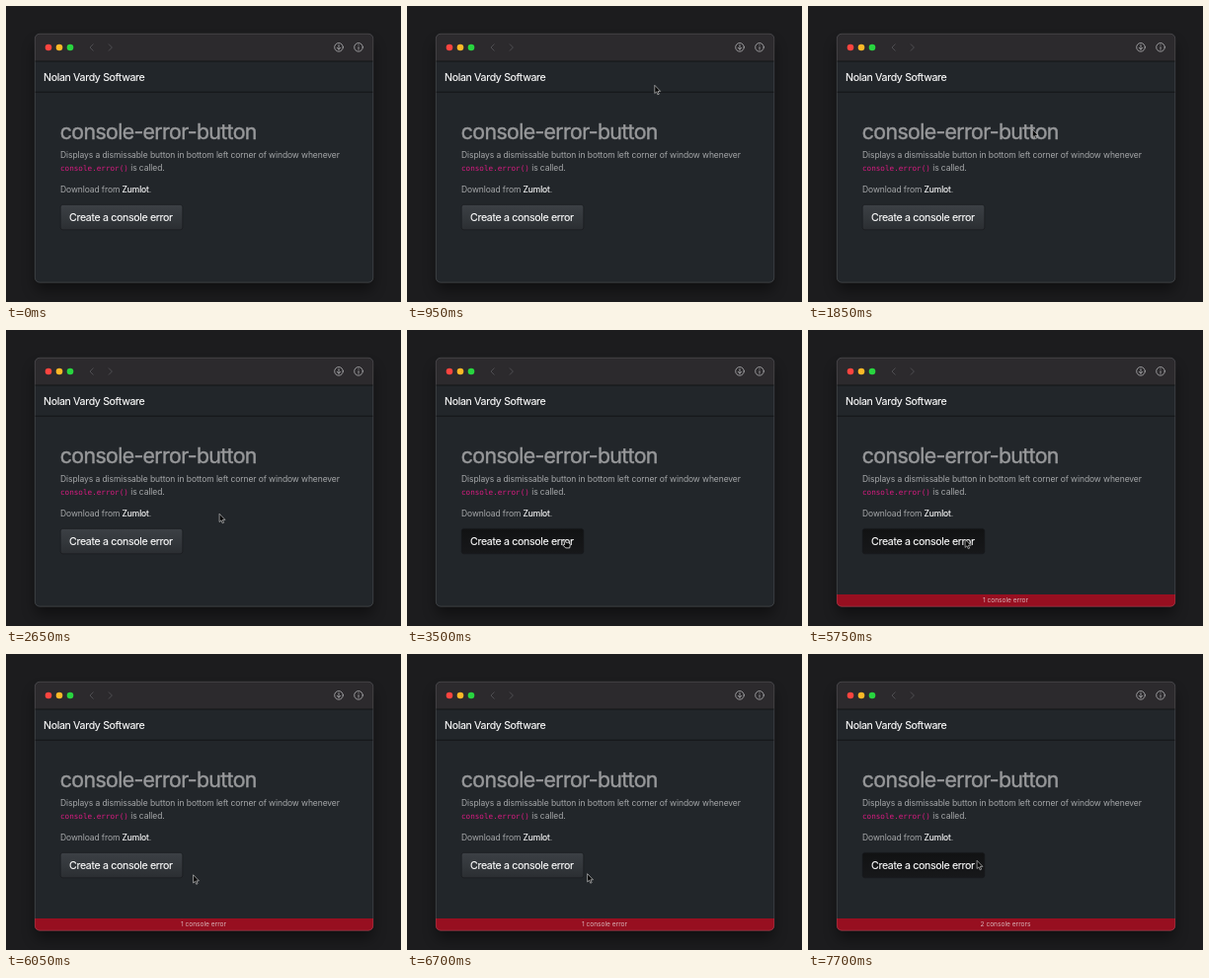
An HTML page that plays this animation: 400 px wide and 300 px high, repeating every 8 s.

```html
<!DOCTYPE html>
<html lang="en">
<head>
<meta charset="utf-8">
<title>console-error-button</title>
<style>
  html, body { margin: 0; width: 100%; height: 100%; overflow: hidden; background: #1c1c1e; }
  svg { display: block; width: 100%; height: 100%; }
  text { font-family: Inter, "Open Sans", sans-serif; font-optical-sizing: none; white-space: pre; }
  .large { font-size: 10.6px; letter-spacing: -.33px; fill: #fff; stroke: #fff; stroke-width: .12px; }
  .body { font-size: 8.5px; letter-spacing: -.088px; fill: #a6a8aa; }
  .heading { font-size: 21.3px; letter-spacing: -.64px; fill: #98999b; stroke: #98999b; stroke-width: .4px; }
  .code { font: 7.64px "DejaVu Sans Mono", "Noto Sans Mono", monospace; letter-spacing: 0; fill: #d81b80; }
  .link { fill: #fff; stroke: #fff; stroke-width: .12px; }
  .count { font-size: 6.6px; fill: #d8b4b8; text-anchor: middle; }
  .line { fill: none; stroke-linecap: round; stroke-linejoin: round; }
</style>
</head>
<body>
<svg viewBox="0 0 400 300">
  <defs>
    <linearGradient id="idle" x2="0" y2="1">
      <stop stop-color="#3c4045"/><stop offset=".6" stop-color="#32363a"/><stop offset="1" stop-color="#2b2e32"/>
    </linearGradient>
    <linearGradient id="dark" x2="0" y2="1">
      <stop stop-color="#111213"/><stop offset="1" stop-color="#17181a"/>
    </linearGradient>
    <filter id="blur" x="-20%" y="-20%" width="140%" height="140%"><feGaussianBlur stdDeviation="7"/></filter>
    <clipPath id="frame"><rect x="29" y="28" width="343" height="252.5" rx="5"/></clipPath>
  </defs>

  <rect width="400" height="300" fill="#1c1c1e"/>
  <rect x="29" y="37" width="343" height="252" rx="6" fill="#000" opacity=".4" filter="url(#blur)"/>

  <g clip-path="url(#frame)">
    <rect x="29" y="28" width="343" height="253" fill="#22262a"/>
    <rect x="29" y="28" width="343" height="28" fill="#2c2a2d"/>
    <rect x="29" y="55.5" width="343" height="1" fill="#131416"/>
    <rect x="29" y="86.7" width="343" height="1" fill="#131518"/>
    <g id="bar">
      <rect x="29" y="268" width="343" height="13" fill="#970f20"/>
      <text class="count" id="count" x="200" y="276.3"></text>
    </g>
  </g>
  <rect x="29.3" y="28.2" width="342.5" height="252" rx="5" fill="none" stroke="#fff" stroke-opacity=".22" stroke-width=".6"/>

  <circle cx="43" cy="42" r="3.3" fill="#fe443f"/>
  <circle cx="54" cy="42" r="3.3" fill="#fdb827"/>
  <circle cx="65" cy="42" r="3.3" fill="#28d53f"/>
  <path class="line" d="M88.2 38.8L85 42L88.2 45.2M104.2 38.8L107.4 42L104.2 45.2" stroke="#4e4d51"/>
  <g class="line" stroke="#b2b1b4" stroke-width=".8">
    <circle cx="337" cy="41.8" r="4.3"/>
    <path d="M337 39.5V44M335.2 42.3L337 44.1L338.8 42.3"/>
    <circle cx="357" cy="41.8" r="4.3"/>
    <path d="M357 41.5V44.1M357 39.5V39.6"/>
  </g>

  <text class="large" x="38" y="75.8">Nolan Vardy Software</text>
  <text class="heading" x="54.8" y="135.3">console-error-button</text>
  <text class="body" x="55" y="154">Displays a dismissable button in bottom left corner of window whenever</text>
  <text class="body" x="55" y="167"><tspan class="code">console.error()</tspan> is called.</text>
  <text class="body" x="55" y="189">Download from <tspan class="link">Zumlot</tspan>.</text>

  <rect id="button" x="55.2" y="201.4" width="123.6" height="25.4" rx="2.4" stroke="#17191b" stroke-width=".6"/>
  <text class="large" x="64" y="217.8">Create a console error</text>

  <g id="cursor">
    <path id="arrow" d="M.1 .3V8.5L2 6.9L3.2 9.8L4.6 9.2L3.3 6.4H5.9Z" fill="#050505" stroke="#d4d4d4" stroke-width=".65" stroke-linejoin="round"/>
    <path id="hand" d="M.9 1.6Q1.6 .6 2.4 1.6L3 4Q4 3.4 4.6 4.2Q5.6 3.8 6 4.7Q7.3 4.5 7.3 6L6.7 9.4H2.7L-.1 6.6Q-.3 5.4 1.7 6Z" fill="#0a0a0a" stroke="#eee" stroke-width=".8" stroke-linejoin="round"/>
  </g>
</svg>
<script>
  const LOOP = 8000, STEP = 50;
  const SHOW = 650, HAND = 3400, CLICK = 4150, BAR = 4200, SECOND = 7650;
  const $ = id => document.getElementById(id);

  // Pointer path: time, x, y
  const path = [
    [600, 245, -12], [950, 250.7, 80], [1200, 241, 113], [1450, 231, 124],
    [1600, 226.5, 122.5], [1800, 226.5, 122.5],
    [2200, 243, 173], [2500, 243, 173],
    [2650, 216, 186], [2900, 180, 203], [3350, 158, 211.5],
    [5700, 158, 211.5],
    [6050, 189.5, 223.5], [6280, 226, 236], [6550, 191, 228],
    [7150, 171, 209], [8000, 171, 209]
  ];

  // Velocity at a key; keys next to a pause stand still
  function slope(i, axis) {
    const a = path[i - 1], b = path[i], c = path[i + 1];
    if (!a || !c || a[axis] === b[axis] || b[axis] === c[axis]) return 0;
    return (c[axis] - a[axis]) / (c[0] - a[0]);
  }

  function pointAt(t) {
    const i = Math.max(0, path.findIndex(k => k[0] > t) - 1);
    const a = path[i], b = path[i + 1], d = b[0] - a[0];
    const u = Math.max(0, (t - a[0]) / d), v = 1 - u;
    return [1, 2].map(n =>
      a[n] * v * v * (1 + 2 * u) + b[n] * u * u * (3 - 2 * u) +
      d * u * v * (slope(i, n) * v - slope(i + 1, n) * u));
  }

  const show = (id, on) => $(id).setAttribute("display", on ? "inline" : "none");

  function draw(t) {
    const [x, y] = pointAt(t);
    const hover = x > 55 && x < 179 && y > 201 && y < 227;
    const hand = t >= HAND && t < CLICK;
    show("cursor", t >= SHOW);
    show("hand", hand);
    show("arrow", !hand);
    show("bar", t >= BAR);
    $("cursor").setAttribute("transform", `translate(${x} ${y})`);
    $("button").setAttribute("fill", hover ? "url(#dark)" : "url(#idle)");
    $("count").textContent = t < SECOND ? "1 console error" : "2 console errors";
  }

  let start;
  function tick(now) {
    start ??= now;
    draw(Math.floor((now - start) % LOOP / STEP) * STEP);
    requestAnimationFrame(tick);
  }
  draw(0);
  requestAnimationFrame(tick);
</script>
</body>
</html>
```
